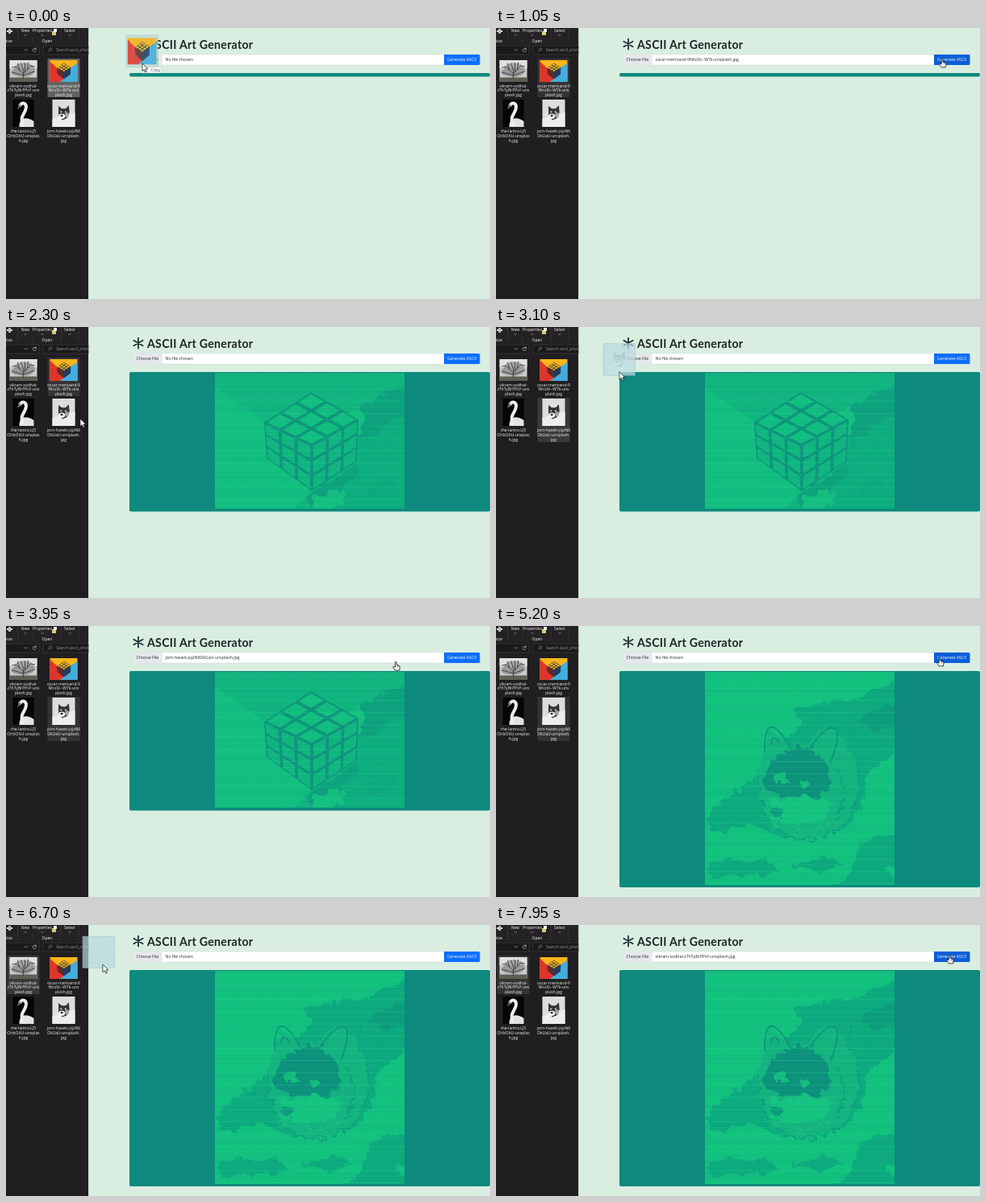
An HTML page that plays this animation: 600 px wide and 337 px high, repeating every 8000 ms.

```html
<!DOCTYPE html>
<html lang="en">
<head>
<meta charset="utf-8">
<title>ASCII Art Generator</title>
<style>
html, body { margin: 0; width: 100%; height: 100%; overflow: hidden; background: #d9eee0; }
svg { display: block; width: 100vw; height: 100vh; }
text { font: 5.2px "Open Sans", "Noto Sans", sans-serif; fill: #212529; }
.dark text { font-size: 5px; fill: #f2f2f2; text-anchor: middle; }
.dark .dim { fill: #9a9a9a; text-anchor: start; }
.title { font: 700 14.2px Lato, sans-serif; letter-spacing: .25px; }
</style>
</head>
<body>
<svg id="stage" viewBox="0 0 600 337"></svg>
<script>
const LOOP = 8000;
const CUBE_DONE = 1350, DOG_DONE = 5100;
const $ = id => document.getElementById(id);

const files = {
  tree: { x: 21.5, y: 39, lines: ['vikram-sodhal-', 'zThTyBrPPsY-uns', 'plash.jpg'] },
  cube: { x: 71.5, y: 39, lines: ['oscar-merivand-9', 'NhoSt--W7k-uns', 'plash.jpg'] },
  swan: { x: 21.5, y: 89, lines: ['the-lantra-LJ5', 'OlrbOltU-unsplas', 'h.jpg'] },
  dog: { x: 71.5, y: 89, lines: ['jorn-havels-jsjzN6', 'DkUaU-unsplash.', 'jpg'] }
};

// Each drag: file, grab time, drop time, time the result resets the field, ghost offset
const drags = [
  { file: 'cube', from: -1000, drop: 350, reset: CUBE_DONE, dx: -20 },
  { file: 'dog', from: 2650, drop: 3500, reset: DOG_DONE, dx: -20 },
  { file: 'tree', from: 6300, drop: 7250, reset: LOOP, dx: -25 }
];

// Pointer stops: time, x, y
const stops = [
  [0, 169, 44], [250, 178, 41], [420, 178, 41], [960, 553, 38], [1500, 553, 38],
  [2300, 92, 114], [2500, 73, 107], [2650, 73, 107], [3300, 176, 41], [3500, 176, 41],
  [4125, 555, 45], [4600, 550, 39], [5450, 550, 39], [6120, 22, 60], [6300, 22, 60],
  [7000, 183, 42], [7250, 183, 41], [7820, 562, 37], [LOOP, 562, 37]
];

const rect = (x, y, w, h, fill, more = '') =>
  `<rect x="${x}" y="${y}" width="${w}" height="${h}" fill="${fill}" ${more}/>`;
const path = (d, fill, more = '') => `<path d="${d}" fill="${fill}" ${more}/>`;
const line = (d, color, w, more = '') =>
  path(d, 'none', `stroke="${color}" stroke-width="${w}" stroke-linecap="round" ${more}`);
const text = (x, y, s, more = '') => `<text x="${x}" y="${y}" ${more}>${s}</text>`;
const oval = (x, y, rx, ry, fill) => `<ellipse cx="${x}" cy="${y}" rx="${rx}" ry="${ry}" fill="${fill}"/>`;

function face(a, b, c, d, fill) {
  const at = (u, v) => [0, 1].map(k =>
    ((1 - u) * (1 - v) * a[k] + u * (1 - v) * b[k] + u * v * c[k] + (1 - u) * v * d[k]).toFixed(1));
  let out = '';
  for (let i = 0; i < 9; i++) {
    const u = i % 3, v = Math.floor(i / 3), lo = .1, hi = .9;
    const p = [[lo, lo], [hi, lo], [hi, hi], [lo, hi]].map(([m, n]) => at((u + m) / 3, (v + n) / 3));
    out += `M${p.join('L')}Z`;
  }
  return path(out, fill);
}

function cube(body, top, left, right) {
  const L = [61, 62], T = [119, 24], R = [178, 58], F = [120, 90];
  const BL = [64, 106], BF = [120, 147], BR = [176, 110];
  return path(`M${[L, T, R, BR, BF, BL].join('L')}Z`, body) +
    face(L, T, R, F, top) + face(L, F, BF, BL, left) + face(F, R, BR, BF, right);
}

const pictures = {
  tree: rect(-17, 1, 34, 27, '#c9cbcc') + rect(-17, 1, 34, 10, '#dfe0e0') +
    rect(-17, 22.5, 34, 5.5, '#5d6155') +
    `<g opacity=".38">${oval(1, 13, 13, 9, '#4c4d49')}${oval(-6, 16, 9, 5, '#4c4d49')}</g>` +
    line('M0 24C-1 20 1 17 0 13L-3 5M0 18L-9 9L-14 10M-5 13L-7 5M0 18L9 8L14 9M5 12L6 4M0 20L-14 16M0 20L14 15M2 15L2 5', '#2d2e2b', .8),
  cube: `<g transform="translate(-17 1) scale(.1447 .16)">` +
    rect(0, 0, 235, 169, '#f9b51b') + path('M0 10L62 62L119 147L85 169H0Z', '#df352c') +
    path('M235 25L178 58L119 147L85 169H235Z', '#43aede') +
    cube('#1c2029', '#efb92e', '#7e3330', '#274a80') + '</g>',
  swan: rect(-13, 0, 26, 34, '#050505') +
    path('M-5 34C-6 25 2 19 13 27V34Z', '#e2e2e2') +
    line('M-4 7C-1 2 5 5 3 12S-4 20 -1 31', '#ededed', 4) +
    path('M-4 5L-8 12L-3 9Z', '#777'),
  dog: rect(-14, 0, 28, 34, '#dcdddc') + path('M-14 24L14 16V34H-14Z', '#ededec') +
    '<g transform="translate(0 4) scale(.8)">' +
    path('M-8 5L-3 9L3 9L8 4L9 15L5 24L-2 27L-8 20Z', '#343435') +
    oval(-3, 21, 5, 4, '#f4f4f2') + oval(5, 19, 3, 4, '#a5a5a2') +
    oval(-4, 14, 1.5, 1, '#fff') + oval(3, 14, 1.5, 1, '#fff') + oval(-3, 20, 2, 1.6, '#222') + '</g>'
};

const thumbs = Object.entries(files).map(([id, f]) => {
  const tall = f.y > 50;
  return `<g transform="translate(${f.x} ${f.y})">
    ${rect(-20, -1, 40, tall ? 55 : 48, '#555', `id="sel-${id}"`)}
    <use href="#pic-${id}"/>
    ${f.lines.map((s, i) => text(0, (tall ? 41 : 34.5) + i * 5.9, s)).join('')}</g>`;
}).join('');

const explorer = `<g class="dark" clip-path="url(#side)">
  ${rect(0, 0, 102.3, 337, '#201e20')}${rect(0, 0, 102.3, 20, '#242224')}
  ${text(24, 5, 'New')}${text(45, 5, 'Properties')}${text(79, 5, 'Select')}
  ${line('M23 8.5l1.2 1.2 1.2-1.2M43.8 8.5l1.2 1.2 1.2-1.2M77.8 8.5l1.2 1.2 1.2-1.2', '#ccc', .6)}
  ${rect(1, 3, 7, 2, '#eee')}${rect(3, 1, 3, 6, '#bbb')}
  ${rect(57, 4, 5, 5, '#d9ca72')}${rect(59, 1, 4, 4, '#eee')}
  ${line('M14.5 0V18M33 12V18M68 0V18M90 0V18', '#444', .5)}
  ${text(3, 17.5, 'nize')}${text(51, 17.5, 'Open')}
  ${rect(-2, 22, 43, 11, '#1b191b', 'stroke="#454345" stroke-width=".6"')}
  ${rect(46, 22, 60, 11, '#1b191b', 'stroke="#454345" stroke-width=".6"')}
  ${line('M23 26.5l1.6 1.6 1.6-1.6M37 26a2.2 2.2 0 1 0 .4 2M37.3 24.6V26.4H35.5', '#bbb', .7)}
  ${line('M52 29.5l2-2a1.6 1.6 0 1 1 .3.3', '#999', .6)}
  ${text(62, 29.3, 'Search ascii_photos', 'class="dim"')}
  ${thumbs}</g>`;

const texture = (w, h) => rect(0, 0, w, h, 'url(#rows)') + rect(0, 0, w, h, 'url(#bright)');

const cubeArt = `<g id="art-cube" transform="translate(259 57)"><g clip-path="url(#wide)">
  ${rect(0, 0, 235, 169, '#12ba80')}
  ${path('M0 18L62 62L64 106L119 147L98 169H0Z', '#13c680')}
  <g filter="url(#rough)">
    ${path('M245 12L212 30L184 50L176 110L122 147L112 158L120 175H245Z', '#11b27f')}
    ${path('M172 60L178 42L200 34L212 26L245 12V48L214 62L200 78L176 84Z', '#0fa57e')}
    ${path('M120 149L150 130L176 112L178 124L160 142L136 158L122 172L112 160Z', '#0fa47e')}
    ${path('M124 156L150 146L166 150L156 162L138 174L118 172Z', '#13c680')}
    ${path('M182 140L214 132L230 142L206 152L190 150Z', '#10ac7f')}
    ${path('M166 46l14-4 6 14-8 22-8-6Z', '#13c680')}
  </g>
  ${cube('#0e967d', '#13c580', '#12bc80', '#12bb80')}
  ${texture(235, 169)}</g></g>`;

const dogArt = `<g id="art-dog" transform="translate(259 57)"><g clip-path="url(#tall)">
  ${rect(0, 0, 235, 265, '#13c97f')}
  <g filter="url(#rough)">
    ${path('M245 10L206 24L190 32L148 38L112 46L120 60L104 84L78 96L62 131L34 152L10 168L1 184L12 200L31 198L60 190L80 200L110 208L150 204L175 192L196 168L201 126L245 94Z', '#10ae7f')}
    ${path('M190 62L212 46L245 38V66L214 72Z', '#0e9e7d')}
    ${path('M62 131L76 98L80 72L106 90L130 88L148 68L166 76L186 106L190 140L182 176L160 200L112 206L80 194L68 166Z', '#12b980')}
    ${path('M72 136L80 112L100 98L116 92L136 98L154 118L154 144L140 158L110 156L90 152L76 146Z', '#0d927c')}
    ${path('M80 158L108 160L126 156L156 160L150 182L116 190L84 184Z', '#14cb81')}
    ${path('M86 126l12 0 6 10-14 4ZM116 136l10-6 6 8-10 6Z', '#13c480')}
    ${oval(89, 175, 8, 6, '#0f9f7e')}
    ${line('M66 131Q64 180 96 200T164 196M174 90Q204 130 184 172M180 84Q176 60 200 60M160 120Q180 140 164 184', '#0f9f7d', 2, 'stroke-dasharray="9 4"')}
    ${line('M72 160L88 190L120 198L156 190', '#14cb81', 2, 'stroke-dasharray="7 5"')}
    ${path('M0 240L34 230L50 238L78 234L92 248L62 254L40 252L10 258ZM104 240L150 230L172 240L140 250Z', '#10ae7f')}
    ${path('M186 226L204 208L245 204V234L222 246L245 256V270H160L182 248Z', '#10ae7f')}
  </g>
  ${line('M74 98Q74 66 84 69T107 97M130 95Q150 66 160 70T156 112M82 90Q84 76 92 88', '#0d947c', 1.8)}
  ${texture(235, 265)}</g></g>`;

const page = `
  ${line('M164 13.6V26.4M158.4 16.8L169.6 23.2M169.6 16.8L158.4 23.2', '#213035', 1.8)}
  ${text(175, 25.5, 'ASCII Art Generator', 'class="title"')}
  ${rect(157, 33, 430.5, 13, '#fff', 'rx="1.5" stroke="#ced4da" stroke-width=".5"')}
  ${path('M193.5 33V46H158.5a1.5 1.5 0 0 1-1.5-1.5V34.5a1.5 1.5 0 0 1 1.5-1.5Z', '#e6e8ec')}
  ${text(161.5, 41.4, 'Choose File')}${text(197.5, 41.4, '', 'id="name"')}
  ${path('M543 33h43a1.5 1.5 0 0 1 1.5 1.5v10a1.5 1.5 0 0 1-1.5 1.5h-43Z', '#0d6efd', 'id="button"')}
  ${text(547, 41.4, 'Generate ASCII', 'style="fill:#fff"')}
  ${rect(153, 56, 447, 4.5, '#0d8a7d', 'rx="2" id="panel"')}
  ${cubeArt}${dogArt}`;

const hand = path('M-.8.6Q0-.6.9.6V4.2L4 5Q5.3 5.4 5.1 7L4.4 10.8H-.8L-3.6 7Q-3.4 5.5-1.8 6.4L-.8 7.2Z',
  '#fff', 'stroke="#111" stroke-width=".8"') + line('M2.2 5V7M3.7 5.3V7', '#111', .4);
const arrow = path('M0 0V9.6L2.2 7.6L3.8 11L5.4 10.3L3.9 7H7Z', '#fff', 'stroke="#111" stroke-width=".7"');

const pattern = (id, w, h, body) =>
  `<pattern id="${id}" width="${w}" height="${h}" patternUnits="userSpaceOnUse">${body}</pattern>`;
const clip = (id, w, h) => `<clipPath id="${id}">${rect(0, 0, w, h, '#000')}</clipPath>`;

$('stage').innerHTML = `<defs>
  ${clip('side', 102.3, 337)}${clip('wide', 235, 169)}${clip('tall', 235, 265)}
  ${pattern('rows', 1.5, 2.1, rect(0, 0, 1.5, .7, '#0c8a7c', 'opacity=".3"') + rect(0, 0, .4, 2.1, '#0c8a7c', 'opacity=".18"'))}
  ${pattern('bright', 235, 15.2, rect(0, 5, 235, .7, '#19d883', 'opacity=".5"') + rect(0, 11.4, 235, .5, '#19d883', 'opacity=".25"'))}
  <filter id="rough"><feTurbulence type="fractalNoise" baseFrequency=".1" numOctaves="4" seed="6"/>
    <feDisplacementMap in="SourceGraphic" scale="15" xChannelSelector="R" yChannelSelector="G"/></filter>
  ${Object.entries(pictures).map(([id, s]) => `<g id="pic-${id}">${s}</g>`).join('')}
  </defs>
  ${rect(0, 0, 600, 337, '#d9eee0')}${page}${explorer}
  <g id="ghost">${rect(0, 0, 39.5, 39.5, '#b7dbe2', 'opacity=".7" stroke="#8fb6c0" stroke-width=".6"')}
    <use id="ghost-pic"/></g>
  <g id="pointer"><g id="hand">${hand}</g><g id="arrow">${arrow}</g>
    <g id="tip">${rect(-1, 4.5, 25, 7.5, '#fff', 'stroke="#aaa" stroke-width=".4"')}
      ${line('M3 6.5V10M1.3 8.3H4.7', '#2058b5', .9)}
      ${text(10.5, 10.1, 'Copy', 'style="fill:#3c4a7c"')}${arrow}</g></g>`;

const show = (id, on) => $(id).setAttribute('display', on ? 'inline' : 'none');
const set = (id, attrs) => { for (const k in attrs) $(id).setAttribute(k, attrs[k]); };

function pointerAt(t) {
  const i = Math.max(1, stops.findIndex(s => s[0] >= t));
  const [t0, x0, y0] = stops[i - 1], [t1, x1, y1] = stops[i];
  const u = (t - t0) / (t1 - t0), e = u * u * (3 - 2 * u);
  return [x0 + (x1 - x0) * e, y0 + (y1 - y0) * e];
}

function draw(t) {
  const [x, y] = pointerAt(t);
  const drag = drags.find(d => t >= d.from && t < d.drop);
  const loaded = drags.find(d => t >= d.drop && t < d.reset);
  const overField = x > 157 && x < 588 && y > 32 && y < 47;
  const selected = t < 2500 ? 'cube' : t < 6100 ? 'dog' : 'tree';

  for (const id in files) {
    show('sel-' + id, id === selected);
    set('sel-' + id, { fill: drag ? (id === 'cube' ? '#626262' : '#3a393a') : '#343334' });
  }
  $('name').textContent = loaded ? files[loaded.file].lines.join('') : 'No file chosen';
  set('button', { fill: overField && x > 543 ? '#0b5ed7' : '#0d6efd' });

  set('panel', { height: t < CUBE_DONE ? 4.5 : t < DOG_DONE ? 173.5 : 269 });
  show('art-cube', t >= CUBE_DONE && t < DOG_DONE);
  show('art-dog', t >= DOG_DONE);

  show('ghost', drag);
  if (drag) {
    set('ghost', { transform: `translate(${x + drag.dx} ${y - 35})` });
    const tall = drag.file === 'dog';
    set('ghost-pic', {
      href: '#pic-' + drag.file,
      transform: tall ? 'translate(19.7 2) scale(1.05)' : 'translate(19.7 2) scale(1.05 1.22)',
      opacity: Math.min(.85, Math.max(0, (t - drag.from - 400) / 500))
    });
  }
  set('pointer', { transform: `translate(${x} ${y})` });
  show('hand', overField && !drag);
  show('tip', overField && drag);
  show('arrow', !overField);
}

const start = performance.now();
function tick() {
  draw((performance.now() - start) % LOOP);
  requestAnimationFrame(tick);
}
tick();
</script>
</body>
</html>
```
